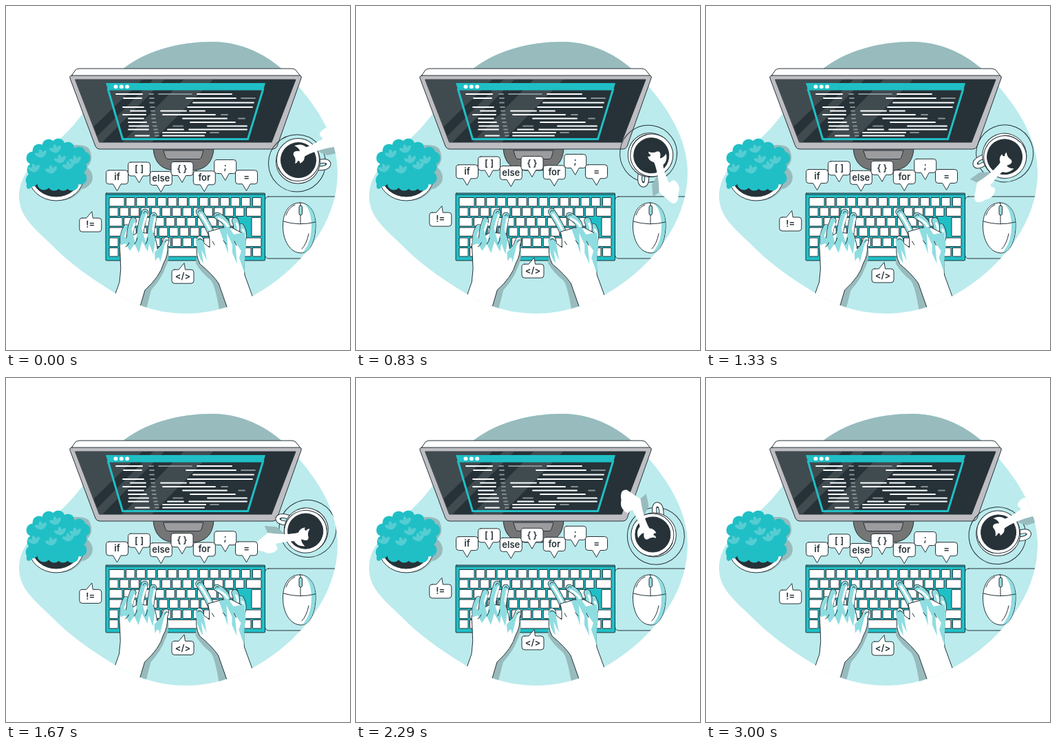
Recreate the animation shown at these times as an HTML page. Size 500 px wide and 500 px high, loop 3.04 s.

```html
<!DOCTYPE html>
<html lang="en">
<head>
<meta charset="utf-8">
<title>Typing desk</title>
<style>
html, body { margin: 0; width: 100%; height: 100%; overflow: hidden; background: #fff }
svg { display: block; width: 100vw; height: 100vh }
.ink { stroke: #263238; stroke-width: 1; stroke-linejoin: round; stroke-linecap: round }
.white { fill: #fff }
.teal { fill: #20bfc6 }
.tint { fill: #8edde1 }
.shade { fill: #98bbbd }
.dark { fill: #263238 }
.none { fill: none }
text { font: 600 13px Inter, "Open Sans", sans-serif; text-anchor: middle; fill: #263238 }
</style>
</head>
<body>
<svg viewBox="0 0 500 500">
  <defs>
    <path id="blob" d="M300 52C350 52 389 78 411 101C447 139 482 188 482 242C482 305 443 360 397 396C355 429 309 447 262 447C223 447 190 436 160 418C125 397 92 374 64 345C39 321 19 305 19 276C19 239 55 214 83 189C112 162 130 125 164 96C201 65 250 52 300 52Z"/>
    <clipPath id="inBlob"><use href="#blob"/></clipPath>
    <clipPath id="inScreen"><path d="M101 107H421L386 198H136Z"/></clipPath>
  </defs>
  <use href="#blob" fill="#bbebed"/>
  <path class="shade" clip-path="url(#inBlob)" d="M140 40H412V100H140Z"/>

  <!-- monitor -->
  <path class="ink" fill="#757575" d="M214 207H302Q300 238 270 239H246Q216 238 214 207Z"/>
  <path class="ink" fill="#9c9c9f" d="M229 210H287L284 220Q283 222.500 280 222.500H236Q233 222.500 232 220Z"/>
  <path class="ink white" d="M94 103L101 93Q103 91 107 91H415Q419 91 421 93L429 103Z"/>
  <path class="ink" fill="#bdbdc2" d="M96 101H426Q430 101 429 105L394 204Q392 208 388 208H136Q132 208 130 204L93 105Q92 101 96 101Z"/>
  <path class="ink dark" d="M101 107H421L386 198H136Z"/>
  <path clip-path="url(#inScreen)" fill="#fff" opacity=".12" d="M101 107H198L127 176ZM214 107H230L140 198H124ZM258 107H301L212 198H169Z"/>
  <path class="none" stroke="#20bfc6" stroke-width="3" d="M148 120L169.500 193.500H351.500L374 120"/>
  <path class="teal" d="M145 112H377L374 122.500H148.500Z"/>
  <g class="white"><ellipse cx="159.500" cy="117.300" rx="3" ry="2.800"/><ellipse cx="167.800" cy="117.300" rx="3" ry="2.800"/><ellipse cx="176.100" cy="117.300" rx="3" ry="2.800"/></g>
  <g id="code" stroke-width="1.800" stroke-linecap="round"></g>

  <!-- plant -->
  <path class="shade" d="M76 205Q118 197 122 210Q128 224 118 234Q130 245 124 257Q117 266 110 266Q97 284 76 283Z"/>
  <ellipse class="ink white" cx="73" cy="248" rx="40" ry="35"/>
  <ellipse class="ink dark" cx="73" cy="247" rx="35" ry="30"/>
  <g id="leaves" class="teal"></g>

  <!-- keyboard and mouse -->
  <g id="keys" class="ink white">
    <rect class="teal" x="145" y="272" width="231.500" height="98" rx="1"/>
    <path class="none" d="M146 274H376"/>
  </g>
  <g clip-path="url(#inBlob)">
    <rect class="ink none" x="376.500" y="277" width="130" height="90" rx="5"/>
  </g>
  <path class="ink white" d="M427 286C444 286 451 304 450 322C449 345 440 359 429 359C413 359 402 341 402.500 318C403 300 411 286 427 286Z"/>
  <path class="tint" d="M432 287C446 291 451 306 449.500 324C448 345 440 358 431 358.500C442 346 444 333 444 317C443 302 440 292 432 287Z"/>
  <path class="ink none" d="M403 313Q426 320 450 314M428 286V290M428 304V317M407 304Q411 292 420 289M440 331Q437 346 430 353"/>
  <rect class="ink tint" x="426" y="290" width="4.500" height="14" rx="2.200"/>

  <!-- hands -->
  <g clip-path="url(#inBlob)"><g id="hands">
    <path class="shade" d="M234 342Q241 362 231 382Q226 396 211 413L204 440H190L201 410Q228 380 228 350Z"/>
    <path class="shade" d="M279 345L276 374Q283 387 298 399Q304 406 310 442H324L308 400L285 370Z"/>
    <g id="fingersL"></g>
    <path class="ink white" d="M158 421L165 401Q168 383 166 363L165 346Q171 336 180 336L192 329L215 331Q220 347 220 353Q227 348 228 341Q230 335 235 336Q239 338 235 348Q236 362 229 374Q224 393 202 413L194 440H158Z"/>
    <path class="tint" d="M166 348L167 330L175 338L181 319L188 344L194 312L203 343L210 317L217 340L214 361L208 345L206 357L198 342L193 359L187 346L180 356L174 345ZM227 347Q229 337 235 338L230 349L224 373Q223 359 217 371L216 358Z"/>
    <path class="ink none" d="M231 343Q234 339 236 340M187 346Q190 342 191 337M203 346Q206 342 206 337M174 350Q178 348 179 344"/>
    <g id="fingersR"></g>
    <path class="ink white" d="M322 440L309 403Q300 390 282 375Q275 362 278 347Q275 339 280 334Q288 334 288 345L296 351Q297 338 294 328L312 323L328 322L343 330Q349 338 348 350Q345 372 347 391L359 424V440Z"/>
    <path class="tint" d="M347 329L349 349Q346 366 347 389L339 366L342 356L333 343L336 375L329 359L329 347L321 330L323 360L315 338L310 324L324 321L331 332ZM277 348Q274 337 281 336Q288 338 288 347L292 370L284 354L287 374Q279 365 277 348Z"/>
    <path class="ink none" d="M279 340Q283 336 287 342M300 342L303 347M316 341L320 346M332 342L335 348"/>
  </g></g>

  <!-- coffee -->
  <g clip-path="url(#inBlob)"><g id="cup">
    <circle class="ink none" cx="423" cy="228.500" r="41.500"/>
    <path class="shade" d="M452 211L474 202L484 213L467 217Z"/>
    <path class="ink none" style="stroke-width:7" d="M452 227Q467 223 469 229Q469 236 454 236"/>
    <path class="none" stroke="#fff" stroke-width="5" d="M452 227Q467 223 469 229Q469 236 454 236"/>
    <ellipse class="ink white" cx="424.500" cy="226" rx="32" ry="32"/>
    <circle class="ink white" cx="424.500" cy="223.500" r="31"/>
    <circle class="ink dark" cx="425" cy="224" r="25.500"/>
    <path class="ink none" d="M396 235Q401 248 414 253"/>
    <path class="white" d="M459 181Q465 175 474 177Q490 174 489 185L476 205Q458 208 446 213Q436 217 434 219Q434 226 427 229Q428 225 424 225Q424 228 420 229Q422 222 418 217Q416 210 427 211Q426 206 419 203Q430 199 436 205Q445 203 455 196Q463 194 458 190Q453 187 459 181Z"/>
  </g></g>

  <g id="tags"></g>
</svg>
<script>
const LOOP = 3040;
const $ = id => document.getElementById(id);
const add = (id, markup) => $(id).insertAdjacentHTML('beforeend', markup);

// Each row: y, then start and end pairs; a negative start means a muted line.
const code = `128 160 198 -208 214 -222 270 278 328
134 171 197 -209 215 262 334 -342 362
140.5 -209 215 272 360
147 170 200 -210 216 264 358
152.5 181 203 -211 216 225 262 267 289
158 170 203 -212 217 228 304 -313 322
163.5 178 200 -212 217 257 321 -338 347
169 178 204 -213 218 268 333
174.500 179 207 -214 219 -243 257 293 350
179.500 178 207 -215 220 235 258 266 350
184 -216 221 228 290 -297 309
188.500 188 208 -217 222 228 288`;
for (const row of code.split('\n')) {
  const [y, ...ends] = row.split(' ').map(Number);
  for (let i = 0; i < ends.length; i += 2) {
    const color = ends[i] < 0 ? '#879094' : '#fff';
    add('code', `<path stroke="${color}" d="M${Math.abs(ends[i])} ${y}H${ends[i + 1]}"/>`);
  }
}

add('leaves', '<path d="M38 214L60 202L82 202L112 213L113 233L108 252L90 258L40 258Z"/>');
const clumps = '39 221 40 238 38 253 48 210 62 203 76 202 90 207 106 214 113 221 108 234 108 250 96 259 83 259 70 259 55 258'.split(' ');
for (let i = 0; i < clumps.length; i += 2)
  add('leaves', `<circle cx="${clumps[i]}" cy="${clumps[i + 1]}" r="9.500"/>`);
add('leaves', '<ellipse cx="34" cy="260" rx="4" ry="6" transform="rotate(20 34 260)"/>');
const sprigs = [[52, 219], [73, 212], [42, 240], [67, 242], [92, 236], [80, 227], [102, 228]];
for (const [x, y] of sprigs)
  for (const turn of [-65, -15, 35])
    add('leaves', `<ellipse cx="${x}" cy="${y - 5}" rx="2.700" ry="6" fill="#55cdd2" transform="rotate(${turn} ${x} ${y})"/>`);

const key = (x, y, w, h = 12.5) => add('keys', `<rect x="${x}" y="${y}" width="${w}" height="${h}" rx=".5"/>`);
// Each row: y, first key width, count of plain keys, start of last key.
const rows = [[278.5, 22, 12, 358.5], [293, 13, 12, 349.5], [307.5, 19, 11, 357], [322, 24, 11, 357],
  [337, 13, 12, 347], [351.5, 13, 4, 358.5]];
rows.forEach(([y, first, count, last], r) => {
  key(150, y, first);
  for (let i = 0; i < count; i++) key(152.5 + first + i * 15.25, y, 12.7);
  if (r != 3) key(last, y, 371 - last, r == 2 ? 27 : 12.5);
});
key(231, 351.5, 53);
for (const x of [287, 302, 317, 343]) key(x, 351.5, 13);

const finger = (id, d, w) => add(id, `
  <path class="ink none" style="stroke-width:${w + 1.6}" d="${d}"/>
  <path fill="none" stroke="#8edde1" stroke-width="${w}" stroke-linecap="round" d="${d}"/>
  <path fill="none" stroke="#fff" stroke-width="${w * .35}" stroke-linecap="round" transform="translate(${w * .25} 4)" d="${d}"/>`);
finger('fingersL', 'M171 347Q168 334 175 322', 8);
finger('fingersL', 'M181 343Q178 330 185 312', 8.5);
finger('fingersL', 'M195 340Q194 322 202 300', 9);
finger('fingersL', 'M210 342Q210 325 214.500 305', 9);
finger('fingersR', 'M343 343Q348 331 342 321', 8);
finger('fingersR', 'M330 337Q339 323 333 312', 8.5);
finger('fingersR', 'M319 333Q328 315 307 305', 9);
finger('fingersR', 'M301 337Q293 316 281 299', 9);
add('fingersL', '<path class="ink none" d="M200 301Q202 296 205 300M213 305Q215 301 217 305"/>');
add('fingersR', '<path class="ink none" d="M279 300Q280 295 284 298M304 306Q306 302 310 304"/>');

const tag = (label, x, y, tail) => add('tags', `
  <path class="ink white" d="M${x - 12} ${y - 10}${tail < 0 ? `h6l8 -9.500l1.500 9.500` : 'h15.500'}h8.500q4 0 4 4v12q0 4 -4 4` +
  `${tail < 0 ? 'h-24' : 'h-6.500l-5.500 10l-6 -10h-6'}q-4 0 -4 -4v-12q0 -4 4 -4Z"/>
  <text x="${x}" y="${y + 4.3}">${label}</text>`);
tag('if', 161.5, 248.8, 1);
tag('[ ]', 193.5, 237, 1);
tag('else', 225.3, 250.5, 1);
tag('{ }', 256, 236.5, 1);
tag('for', 288.3, 249.8, 1);
tag(';', 318.7, 233.5, 1);
tag('=', 349.5, 248.7, 1);
tag('!=', 122.8, 318.2, -1);
tag('&lt;/&gt;', 257, 393.2, -1);

const ease = p => (1 - Math.cos(Math.PI * p)) / 2;
const sway = [[0, 0], [.29, -2], [.55, 3.3], [.75, -.8], [1, 0]];
function swayAt(p) {
  const i = sway.findIndex(k => k[0] > p);
  const [a, from] = sway[i - 1], [b, to] = sway[i];
  return from + (to - from) * ease((p - a) / (b - a));
}

function draw(now) {
  const p = now % LOOP / LOOP, half = p * 2 % 1;
  $('cup').setAttribute('transform', `rotate(${p * 360} 430 222.500)`);
  $('tags').setAttribute('transform', `translate(0 ${-8.2 * ease(half * 2)})`);
  $('hands').setAttribute('transform', `translate(${swayAt(half)} 0)`);
}
const start = performance.now();
function tick() {
  draw(performance.now() - start);
  requestAnimationFrame(tick);
}
tick();
</script>
</body>
</html>
```
